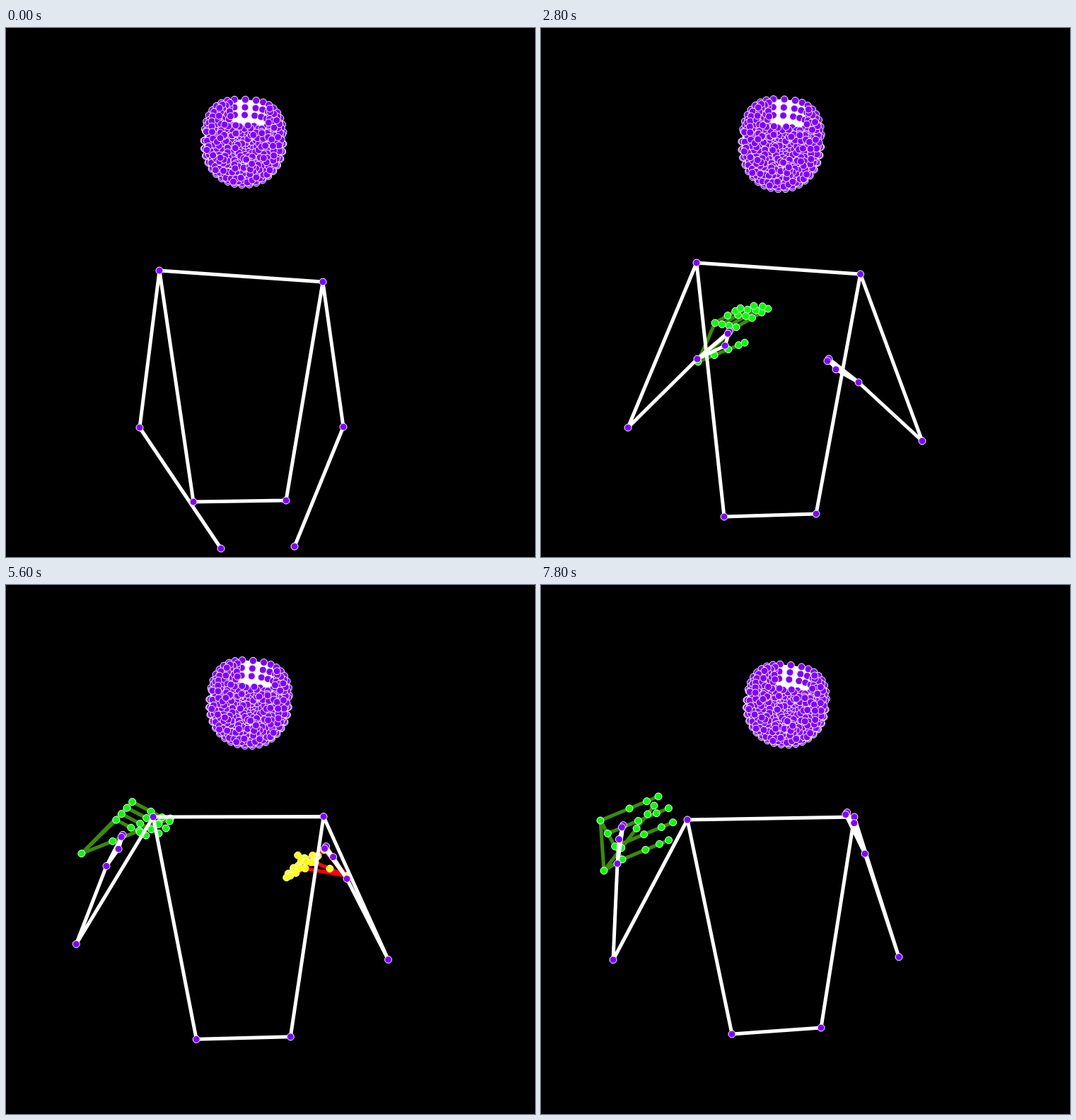
These frames come from a looping animation (748 by 748 pixels, 8 s). An HTML page with a canvas:

```html
<!DOCTYPE html>
<html lang="en">
<head>
<meta charset="utf-8">
<title>Body tracking</title>
<style>
html, body { margin: 0; width: 100%; height: 100%; overflow: hidden; background: #000; }
canvas { display: block; width: 100vw; height: 100vh; }
</style>
</head>
<body>
<canvas id="stage" width="748" height="748"></canvas>
<script>
const SIZE = 748, LOOP = 8000, STEP = 200, LAST = LOOP / STEP - 1, TAU = Math.PI * 2;
const PURPLE = '#8000ff', WHITE = '#fff';
const ctx = document.getElementById('stage').getContext('2d');

const add = ([ax, ay], [bx, by]) => [ax + bx, ay + by];
const mix = ([ax, ay], [bx, by], f) => [ax + (bx - ax) * f, ay + (by - ay) * f];
const scale = ([x, y], f) => [x * f, y * f];
function smoothstep(from, to, v) {
  const f = Math.min(1, Math.max(0, (v - from) / (to - from)));
  return f * f * (3 - 2 * f);
}

// A smooth path through points at the given steps, held at both ends.
function path(steps, ...points) {
  const last = points.length - 1;
  return at => {
    if (at <= steps[0]) return points[0];
    if (at >= steps[last]) return points[last];
    const i = steps.findIndex(step => step > at) - 1, j = i + 1;
    const before = Math.max(i - 1, 0), after = Math.min(j + 1, last);
    const span = steps[j] - steps[i], f = (at - steps[i]) / span;
    return points[i].map((a, axis) => {
      const b = points[j][axis];
      const slopeA = (b - points[before][axis]) / (steps[j] - steps[before]) * span;
      const slopeB = (points[after][axis] - a) / (steps[after] - steps[i]) * span;
      return a + (b - a) * smoothstep(0, 1, f) + slopeA * f * (1 - f) ** 2 - slopeB * f * f * (1 - f);
    });
  };
}

const joint = path.bind(null, [0, 7, 14, 19, 24, 32, 39]);
const leftShoulder = joint([217,343], [210,347], [220,332], [214,337], [213,344], [204,314], [207,332]);
const leftElbow = joint([189,565], [146,558], [123,565], [100,558], [101,521], [98,504], [102,530]);
const leftWrist = joint([304,736], [281,618], [221,468], [201,488], [144,481], [144,327], [108,394]);
const rightElbow = joint([477,564], [513,558], [539,584], [540,578], [546,552], [531,514], [506,526]);
const rightWrist = joint([408,733], [407,688], [449,501], [478,498], [499,489], [462,350], [458,380]);
const leftHip = joint([265,670], [272,689], [259,691], [257,686], [275,665], [262,625], [270,635]);
const rightHip = joint([396,668], [414,689], [389,687], [396,679], [402,662], [401,620], [396,626]);

// The shoulder line starts tilted and levels out.
function rightShoulder(at) {
  const s = at / LAST;
  return [448 + 6 * Math.sin(Math.PI * s) - 5 * s,
    leftShoulder(at)[1] + 16 - 20 * smoothstep(.35, .85, s)];
}

// Pinky, index and thumb markers continue the forearm, bent inward.
function fingerMarkers(elbow, wrist, inward, toPinky) {
  const index = add(mix(elbow, wrist, 1.4), [inward, 0]);
  return [add(index, toPinky), index, add(index, [-2, 3])];
}

function bodyPoints(at) {
  const elbows = [leftElbow(at), rightElbow(at)], wrists = [leftWrist(at), rightWrist(at)];
  return [leftShoulder(at), rightShoulder(at), ...elbows, ...wrists, leftHip(at), rightHip(at),
    ...fingerMarkers(elbows[0], wrists[0], 6, [-6, 20]),
    ...fingerMarkers(elbows[1], wrists[1], -6, [10, 15])];
}

const BODY_EDGES = [[0,1], [0,2], [2,4], [1,3], [3,5], [0,6], [1,7], [6,7],
  [4,8], [4,9], [4,10], [8,9], [5,11], [5,12], [5,13], [11,12]];

// Hand landmarks are offsets from the body wrist; reach is a finger's full vector.
const leftSteps = [7, 14, 32, 39], rightSteps = [7, 19, 24, 32];
const leftHand = {
  root: path(leftSteps, [11,-15], [1,4], [-41,-20], [-19,10]),
  thumb: path(leftSteps, [59,28], [67,-23], [91,-77], [52,-82]),
  index: path(leftSteps, [116,7], [55,-45], [28,-96], [-24,-61]),
  pinky: path(leftSteps, [105,14], [25,-51], [13,-60], [7,-6]),
  reach: path(leftSteps, [-35,22], [45,-26], [55,34], [82,-34])
};
const rightHand = {
  root: path(rightSteps, [-22,-14], [-9,2], [-13,3], [17,-13]),
  thumb: path(rightSteps, [-71,-15], [-39,3], [-47,11], [-95,-88]),
  index: path(rightSteps, [-81,31], [-33,-42], [-30,-20], [-35,-70]),
  pinky: path(rightSteps, [-36,52], [-84,-28], [-65,-10], [-55,-23]),
  reach: path(rightSteps, [-22,60], [4,52], [-10,42], [-58,-14])
};

function handPoints(hand, wrist, at) {
  const root = hand.root(at), points = [root];
  for (const f of [.35, .65, .87, 1]) points.push(mix(root, hand.thumb(at), f));
  [1, 1.05, 1, .8].forEach((length, finger) => {
    const knuckle = mix(hand.index(at), hand.pinky(at), finger / 3);
    for (const f of [0, .5, .8, 1]) points.push(add(knuckle, scale(hand.reach(at), f * length)));
  });
  return points.map(p => add(p, wrist));
}

const HAND_EDGES = [[0,1], [0,5], [0,17], [5,9], [9,13], [13,17]];
for (let base = 1; base < 21; base += 4)
  for (let i = base; i < base + 3; i++) HAND_EDGES.push([i, i + 1]);

const onStage = ([x, y]) => x >= 0 && x <= SIZE && y >= 0 && y <= SIZE;

function drawDots(points, color) {
  ctx.fillStyle = color;
  ctx.strokeStyle = WHITE;
  ctx.lineWidth = 1;
  for (const [x, y] of points.filter(onStage)) {
    ctx.beginPath();
    ctx.arc(x, y, 5, 0, TAU);
    ctx.fill();
    ctx.stroke();
  }
}

// Points off the stage are left out together with their lines.
function drawGraph(points, edges, lineColor, dotColor) {
  ctx.strokeStyle = lineColor;
  ctx.lineWidth = 5;
  ctx.beginPath();
  for (const [a, b] of edges) {
    if (!onStage(points[a]) || !onStage(points[b])) continue;
    ctx.moveTo(...points[a]);
    ctx.lineTo(...points[b]);
  }
  ctx.stroke();
  drawDots(points, dotColor);
}

// Face in unit coordinates: a dome, flatter on top and rounder at the chin.
const SPOKES = 36;
const power = (v, p) => Math.sign(v) * Math.abs(v) ** p;
function domePoint(angle, rx, ry) {
  const p = Math.sin(angle) < 0 ? .74 : .96;
  return [power(Math.cos(angle), p) * rx, power(Math.sin(angle), p) * ry];
}

function makeFace() {
  const rings = [], inner = [];
  for (let row = 0; row < 3; row++)
    for (let i = 0; i < SPOKES; i++) {
      const angle = i / SPOKES * TAU, top = Math.sin(angle) < 0;
      const dome = 1 - .02 * row * row;
      rings.push(domePoint(angle, dome, top ? 1 - .18 * row : 1 - .04 * row * row));
    }
  // Sunflower fill, leaving the middle of the forehead open.
  const count = 330, goldenAngle = Math.PI * (3 - Math.sqrt(5));
  for (let i = 0; i < count; i++) {
    const r = .96 * Math.sqrt(i / count), [u, v] = domePoint(i * goldenAngle, r, r);
    if (v > -.42 || Math.abs(u - .12) > .45) inner.push([u, v]);
  }
  for (let i = 0; i < 24; i++) {
    const c = Math.cos(i / 24 * TAU), s = Math.sin(i / 24 * TAU);
    inner.push([-.4 + .2 * c, -.22 + .08 * s], [.44 + .2 * c, -.18 + .08 * s], [.03 + .2 * c, .5 + .1 * s]);
  }
  // A coprime stride mixes the stacking order.
  return rings.concat(inner.map((_, i) => inner[i * 149 % inner.length]));
}
const FACE = makeFace();

function drawFace(at) {
  const s = at / LAST, tilt = .04 + .08 * s;
  const cx = 336 + 10.5 * s, cy = 161.5 + 8 * s;
  const rx = 56, ry = 59.5 + 4 * Math.cos((at - 14) / 18 * TAU);
  const cos = Math.cos(tilt), sin = Math.sin(tilt);
  const points = FACE.map(([u, v]) =>
    [cx + rx * u * cos - ry * v * sin, cy + rx * u * sin + ry * v * cos]);
  ctx.fillStyle = WHITE;
  ctx.beginPath();
  for (const p of points.slice(0, SPOKES)) ctx.lineTo(...p);
  ctx.fill();
  drawDots(points, PURPLE);
}

const within = (at, ...ranges) => ranges.some(([from, to]) => at >= from && at <= to);

function draw(at) {
  ctx.fillStyle = '#000';
  ctx.fillRect(0, 0, SIZE, SIZE);
  drawFace(at);
  if (within(at, [4, 16], [26, 39]))
    drawGraph(handPoints(leftHand, leftWrist(at), at), HAND_EDGES, '#3a8c06', '#0f0');
  if (within(at, [5, 9], [17, 35]))
    drawGraph(handPoints(rightHand, rightWrist(at), at), HAND_EDGES, '#f00', '#ff0');
  drawGraph(bodyPoints(at), BODY_EDGES, WHITE, PURPLE);
}

const start = performance.now();
function frame() {
  draw(Math.floor((performance.now() - start) % LOOP / STEP));
  requestAnimationFrame(frame);
}
frame();
</script>
</body>
</html>
```
